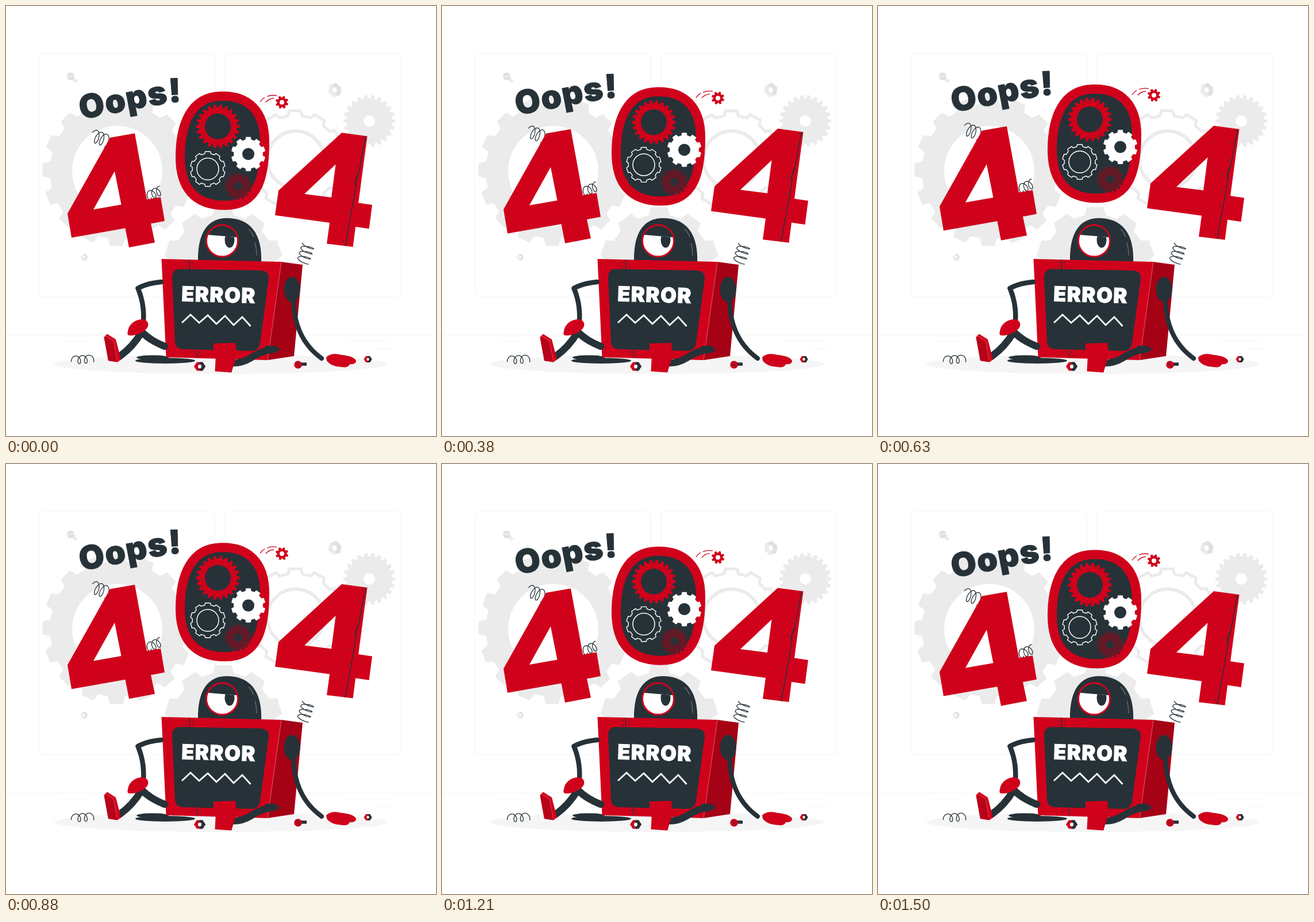
These frames come from a looping animation (748x748 px, 1540 ms). An HTML page:

```html
<!DOCTYPE html>
<html lang="en">
<head>
<meta charset="utf-8">
<title>404</title>
<style>
html, body { margin: 0; width: 100%; height: 100%; overflow: hidden; background: #fff; }
svg { display: block; width: 100%; height: 100%; }
text { font-family: Inter, "Open Sans", sans-serif; font-weight: 900; stroke-width: 1; }
</style>
</head>
<body>
<svg id="stage" viewBox="0 0 748 748"></svg>
<script>
const RED = '#d0021b', SHADE = '#a60216', INK = '#263238', GREY = '#ebebeb';
const { sin, cos, PI } = Math;

const fill = (d, color, extra = '') => `<path d="${d}" fill="${color}" fill-rule="evenodd" ${extra}/>`;
const line = (d, color, width, extra = '') =>
  `<path d="${d}" fill="none" stroke="${color}" stroke-width="${width}" ${extra}/>`;
const ellipse = (x, y, rx, ry, color, extra = '') =>
  `<ellipse cx="${x}" cy="${y}" rx="${rx}" ry="${ry}" fill="${color}" ${extra}/>`;
const disc = (x, y, r, color, extra) => ellipse(x, y, r, r, color, extra);
const ring = (x, y, r, color, width) => disc(x, y, r, 'none', `stroke="${color}" stroke-width="${width}"`);
const dots = (list, color = INK) => list.map(([x, y]) => disc(x, y, 1.1, color)).join('');

const polygon = points => 'M' + points.map(p => p.map(v => v.toFixed(1)).join(' ')).join('L') + 'Z';
const hole = (x, y, r) => `M${x - r} ${y}a${r} ${r} 0 1 0 ${2 * r} 0a${r} ${r} 0 1 0 ${-2 * r} 0Z`;

// Toothed wheel outline; phase is the direction of the first tooth in degrees.
function gear(x, y, tip, root, teeth, phase = 0) {
  const points = [];
  for (let i = 0; i < teeth; i++) {
    for (const [shift, r] of [[-.32, root], [-.22, tip], [.22, tip], [.32, root]]) {
      const a = (i + shift) * 2 * PI / teeth + phase * PI / 180;
      points.push([x + r * cos(a), y + r * sin(a)]);
    }
  }
  return polygon(points);
}

// Wire spring running from (x0, y0) to (x1, y1).
function spring(x0, y0, x1, y1, turns, along, across, phase = 0) {
  const dx = x1 - x0, dy = y1 - y0, len = Math.hypot(dx, dy), ux = dx / len, uy = dy / len;
  let d = '';
  for (let i = 0; i <= 80; i++) {
    const u = i / 80, a = 2 * PI * turns * u + phase;
    const s = u * len + along * cos(a), n = across * sin(a);
    d += `${i ? 'L' : 'M'}${(x0 + ux * s - uy * n).toFixed(1)} ${(y0 + uy * s + ux * n).toFixed(1)}`;
  }
  return line(d, INK, 1.3, 'stroke-linecap="round"');
}

const nut = (x, y, rx, ry, body, face, core) =>
  fill(polygon([[x - rx, y], [x - rx / 2, y - ry], [x + rx / 2, y - ry], [x + rx, y], [x + rx / 2, y + ry], [x - rx / 2, y + ry]]), body) +
  fill(polygon([[x - rx / 4, y], [x, y - ry], [x + rx / 2, y - ry], [x + rx, y], [x + rx / 2, y + ry], [x, y + ry]]), face) +
  ellipse(x, y, rx * .3, ry * .45, core);

const room =
  line('M63 83H357q6 0 6 6V499q0 6-6 6H63q-6 0-6-6V89q0-6 6-6Z M387 83H681q6 0 6 6V499q0 6-6 6H387q-6 0-6-6V89q0-6 6-6Z', '#f5f5f5', 1.2) +
  line('M0 572.5H748', '#f5f5f5', 1) +
  line('M98 583.5H140M592 582.5H665M640 596.5H672', '#f5f5f5', 1) +
  fill(gear(194, 287, 131, 118, 16, 181) + hole(193.5, 287, 78.5), GREY) +
  line(gear(503, 267, 85, 77, 12, 90), GREY, 5) + ring(504, 267, 49.5, GREY, 6) +
  fill(gear(632, 200, 45, 39.5, 22) + hole(632, 200, 10), GREY) +
  fill(gear(378, 453, 104, 91, 10, 90), GREY) +
  line('M115 125L123 132', GREY, 5) + disc(112.5, 122.5, 6.8, '#e0e0e0') + line('M106 123.5L119 121', '#fff', 1) +
  `<g transform="rotate(-20 572 146)">${nut(572, 146, 12, 11, GREY, '#e0e0e0', '#fff')}</g>` +
  nut(136, 437, 6, 5.5, GREY, '#e0e0e0', '#fff') +
  ellipse(374, 623, 290, 17, '#f5f5f5');

const leftFour =
  spring(153, 226, 176, 235, 2.7, 5, 11, 3.6) + spring(247, 331, 269, 321, 2.7, 5, 8, .6) +
  fill('M181 229L224 221.500L245 336.500L269 332.500L276 374L252 378.500L259 411.500L214 420L207.500 386.500L114 403L107 361Z M152 354L189 287.500L200.500 345.500Z', RED);

const zero =
  fill('M374 156.700C422 155 450 184 450 236C450 293 441 346.700 381 346.700C327 346.700 303 315 303 263C303 207 321 157.500 374 156.700Z', INK, `stroke="${RED}" stroke-width="16"`) +
  fill(gear(368.5, 209.5, 38, 33, 22) + hole(368.5, 209.5, 22.5), RED) +
  fill(gear(404, 313.5, 23.5, 19.5, 16) + hole(404, 313.5, 7), '#641a26') +
  fill(gear(421.5, 257.5, 30, 25.5, 10, 90), '#fff') + disc(421.5, 257.5, 10.5, INK) +
  line(gear(351, 283.5, 30.5, 27, 10, 90), '#fff', 1.4) + ring(351, 283.5, 19, '#fff', 1.5);

const looseGear =
  fill(gear(480, 167.5, 11.3, 8.5, 8, 20) + hole(480, 167.5, 4), RED) +
  line('M442 167Q445 162 450 159M454 157.500Q462 154 471 156M452 167.500Q457 161 466 160.500', RED, 1.3);

const rightFour =
  fill('M584 220.500L628.500 226.500L613 342.500L637 346L631.500 387.500L608 384L603.500 419L558 413.500L563 377L468 364L474 321Z M519 327L573.500 275.500L566 333Z', RED) +
  line('M625.500 226.500L616 277L613 292L608 304L609 311L604 341L590 417.500', INK, 1.5) +
  line('M613 290L608 305L608.500 312', INK, 2.2) +
  dots([[621, 230], [613, 251], [609, 281], [601, 304], [597, 333], [594, 360], [588, 383], [586, 409]]);

const oops = `<text transform="translate(131 197.500) rotate(-11)" font-size="57" letter-spacing="1.3" fill="${INK}" stroke="${INK}" rotate="0 0 0 2 8">Oops!</text>`;

const limb = (d, width) => line(d, INK, width, 'stroke-linecap="round" stroke-linejoin="round"');

const head =
  fill('M334 444C333 396 350 369 384 369C425 369 446 396 444 447Z', INK) +
  line('M422 388Q428 394 431 402M433 412Q436 422 436 434', '#6b757a', 1.2) +
  '<clipPath id="eye"><path d="M340 397L410 403V445H340Z"/></clipPath>' +
  `<g clip-path="url(#eye)">${disc(376, 408.5, 27, '#fff')}${ellipse(389, 407, 8.5, 13.5, INK)}</g>` +
  ring(376, 408.5, 27.5, RED, 2.8);

const body =
  ellipse(277, 617, 52, 5, INK) + ellipse(255, 611.5, 28, 4, INK) +
  fill('M479 445L516 450L501 609L455 616Z', SHADE) +
  fill('M270.500 440L479 445L455 616L278.500 611Z', RED) +
  line('M479 445L455 616', '#e2606e', .8) +
  line('M319 441L320 459M332 597L333 612', INK, 1.2) +
  dots([[315, 446], [324, 446], [315, 454], [325, 454], [328, 602], [337, 602], [338, 608]]) +
  fill('M303 457.500L443 460Q458 461 457 475L442 586Q440 600 426 600L307 597Q295 596 294 584L289 473Q289 457 303 457.500Z', INK) +
  '<text transform="translate(305 513.500) rotate(1.500)" font-size="36" letter-spacing="1.5" fill="#fff" stroke="#fff">ERROR</text>' +
  line('M306 551L321 537L336 551L351 538L366 553L381 539L396 555L411 541L425.500 557', '#fff', 2.8);

const limbs =
  limb('M270 480Q246 482 229.500 491Q241 518 239 549', 8.5) +
  limb('M276 592Q251 582 236 567Q221 593 197 610', 12.5) +
  fill('M212 566C214 552 226 545 238 545C247 546 250 554 245 561C238 569 225 574 214 573C211 572 211 569 212 566Z', RED) +
  fill('M170.500 576L176 570.500L191 580L200 615L194 619.500L178 617Z', RED) +
  fill('M170.500 576L187 583L194 619.500L178 617Z', '#b8021a') +
  line('M172 573L187 582L194 619', '#e2606e', .7) +
  limb('M467 597Q445 599 426 612Q411 621 396 621', 12) + fill('M450 592Q465 588 477 598Q465 606 452 605Z', INK) +
  fill('M361 587L399 586L402 606L392 637.500L363.500 635.500L365 605L361 603Z', RED) +
  line('M399 587L397 605L392 637', '#b0021a', .8) +
  ellipse(497.5, 493, 14, 22, INK) +
  limb('M500 507Q500 578 549 613', 8) +
  fill('M557 611Q566 602 584 607Q605 609 609 617Q609 624 598 623Q596 630 584 628Q565 627 558 617Z', RED);

const floorBits =
  spring(118, 616, 149, 614, 2.7, 5, 7, 2.8) + spring(517, 445, 526, 415, 3.4, 3, 11, 2) +
  nut(337, 627, 10, 7.5, RED, INK, '#fff') + nut(629.5, 614.5, 7, 5.5, RED, INK, '#fff') +
  line('M510 623H523', INK, 5.5) + disc(508, 624, 6.8, RED) + line('M504 619L512 629', INK, 1.2);

document.getElementById('stage').innerHTML =
  room + `<g id="floating">${leftFour + rightFour + zero + looseGear + oops}</g>` +
  head + body + limbs + floorBits;

const floating = document.getElementById('floating');
const LOOP = 1540, STEPS = 37, PEAK = 730, SPEED = .0196;

function draw() {
  const step = Math.floor(performance.now() % LOOP * STEPS / LOOP);
  const time = step * LOOP / STEPS;
  const y = (Math.abs(time - PEAK) - PEAK) * SPEED;
  floating.setAttribute('transform', `translate(0 ${y.toFixed(2)})`);
  requestAnimationFrame(draw);
}
draw();
</script>
</body>
</html>
```
